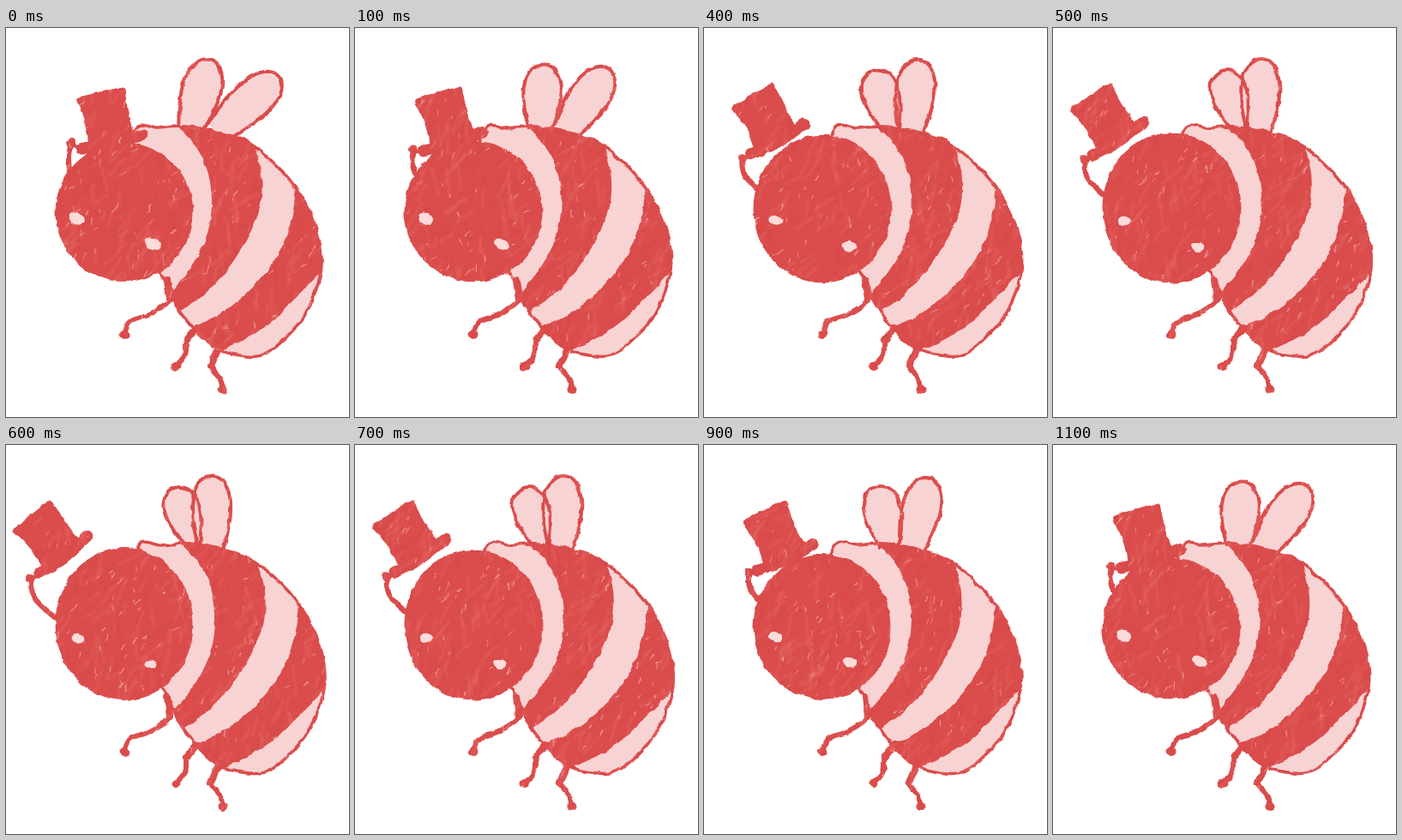
These frames come from a looping animation (400x454 px, 1200 ms). An HTML page with a canvas:

```html
<!DOCTYPE html>
<html lang="en">
<head>
<meta charset="utf-8">
<title>Bee tipping its hat</title>
<style>
  html, body { margin: 0; width: 100%; height: 100%; overflow: hidden; background: #fff; }
  canvas { display: block; filter: url(#rough); }
  svg { position: absolute; width: 0; height: 0; }
</style>
</head>
<body>
<canvas id="stage" width="400" height="454"></canvas>
<svg>
  <filter id="rough" x="0" y="0" width="1" height="1" color-interpolation-filters="sRGB">
    <feTurbulence id="grain" type="fractalNoise" baseFrequency=".08" numOctaves="2" result="n"/>
    <feDisplacementMap in="SourceGraphic" in2="n" scale="5" xChannelSelector="R" yChannelSelector="G"/>
  </filter>
</svg>
<script>
const W = 400, H = 454, RED = '#db4c4c', PINK = '#f8d3d3';
const STEP = 100, LAST = 6;

const stage = document.getElementById('stage').getContext('2d');
const ink = new OffscreenCanvas(W, H).getContext('2d');
const grain = document.getElementById('grain');
ink.lineCap = ink.lineJoin = 'round';

// Smooth curve through x,y pairs; joins on to an existing path if given
function curve(pts, closed, path = new Path2D()) {
  const n = pts.length / 2;
  const p = i => {
    i = closed ? (i + n) % n : Math.max(0, Math.min(n - 1, i));
    return [pts[2 * i], pts[2 * i + 1]];
  };
  path.lineTo(...p(0));
  for (let i = 0; i < (closed ? n : n - 1); i++) {
    const [a, b, c, d] = [p(i - 1), p(i), p(i + 1), p(i + 2)];
    path.bezierCurveTo(b[0] + (c[0] - a[0]) / 6, b[1] + (c[1] - a[1]) / 6,
      c[0] - (d[0] - b[0]) / 6, c[1] - (d[1] - b[1]) / 6, ...c);
  }
  return path;
}

// Stripe between two curves, closed off at two points outside the body
function band(inner, low, outer, high) {
  const path = curve(inner);
  path.lineTo(...low);
  curve(outer, false, path);
  path.lineTo(...high);
  return path;
}

const body = curve([150,122, 180,117, 212,115, 250,122, 285,134, 320,163, 345,194, 364,235, 370,275,
  362,310, 345,343, 305,380, 268,381, 242,371, 217,347, 198,320, 186,292, 140,220], true);
const stripes = [
  band([202,115, 223,138, 237,167, 242,205, 235,246, 216,282, 193,310], [188,335],
    [206,330, 233,311, 260,282, 283,246, 298,210, 300,172, 292,138], [275,95]),
  band([340,186, 336,217, 325,252, 306,284, 277,315, 244,338, 216,350], [220,385],
    [250,377, 277,365, 309,345, 335,320, 354,301, 372,281], [410,225])
];
const legs = [
  [188,294, 191,317, 168,334, 145,343, 138,358],
  [222,350, 211,364, 209,381, 198,395],
  [247,376, 239,394, 249,408, 253,422]
];

// Teardrop from a base point to a tip; root is the base width relative to the belly
function wing(x, y, tipX, tipY, root) {
  const dx = tipX - x, dy = tipY - y, unit = 22 / Math.hypot(dx, dy), pts = [];
  for (let i = -6; i <= 6; i++) {
    const a = i * Math.PI / 12, t = Math.cos(a);
    const s = Math.sin(a) * (root + (1.7 - root) * t) * unit;
    pts.push(x + dx * t - dy * s, y + dy * t + dx * s);
  }
  return curve(pts);
}

function oval(ctx, x, y, rx, ry, tilt = 0) {
  ctx.beginPath();
  ctx.ellipse(x, y, rx, ry, tilt, 0, 2 * Math.PI);
  ctx.fill();
}

function line(path, width) {
  ink.lineWidth = width;
  ink.stroke(path);
}

function drawLeg(pts) {
  line(curve(pts), 6);
  line(curve(pts.slice(0, 4)), 8);
  oval(ink, ...pts.slice(-2), 5.5, 5);
}

function drawHat(x, y, angle) {
  const crown = new Path2D();
  crown.moveTo(-28, -56);
  crown.lineTo(22, -59);
  crown.quadraticCurveTo(19, -25, 24, -4);
  crown.lineTo(-25, -2);
  crown.quadraticCurveTo(-20, -25, -28, -56);
  ink.save();
  ink.translate(x, y);
  ink.rotate(angle);
  ink.fill(crown);
  line(crown, 7);
  line(curve([-36, 1, 0, 2, 36, -3]), 13);
  ink.restore();
}

function drawArm(u, hatX, hatY, angle) {
  const x = 76 - 48 * u, y = 134 + 21 * Math.sqrt(u);
  const endX = 74 - 14 * u, endY = 166 + 38 * u;
  const elbowX = (x + endX) / 2 - 2 - 8 * u, elbowY = (y + endY) / 2;
  line(curve([x, y, elbowX, elbowY, endX, endY]), 6);
  oval(ink, x, y, 5, 5);
  const grip = [hatX - 36 * Math.cos(angle), hatY - 36 * Math.sin(angle) + 3];
  line(curve([x, y, ...grip]), 4);
}

function random(seed) {
  return () => (seed = (seed * 16807) % 2147483647) / 2147483647;
}

// Marker strokes scattered over the inked areas only
function strokes(rnd, count, length, width, colors) {
  ink.lineWidth = width;
  for (let i = 0; i < count; i++) {
    const x = rnd() * W, y = rnd() * H, a = 2 + (rnd() - .5) * 1.4, l = length * (.4 + rnd());
    ink.strokeStyle = colors[i % colors.length];
    ink.beginPath();
    ink.moveTo(x, y);
    ink.lineTo(x + Math.cos(a) * l, y + Math.sin(a) * l);
    ink.stroke();
  }
}

function draw(pose) {
  const u = pose / LAST, back = (1 - u) ** 3, drift = 4 * u - 2;
  const wings = [
    wing(215 + 4 * u, 118, 197 + 41 * back, 50 - 13 * back, .65 - .3 * u),
    wing(245 - 6 * u, 122, 240 + 78 * (1 - u) ** 1.8, 36 + 20 * back, .65)
  ];
  const hatX = 124 - 9.5 * pose, hatY = 134 - .8 * pose;
  const angle = -(10 + 4.1 * pose) * Math.PI / 180;

  stage.clearRect(0, 0, W, H);
  stage.fillStyle = PINK;
  wings.forEach(w => stage.fill(w));
  stage.save();
  stage.translate(drift, 0);
  stage.fill(body);
  stage.restore();

  ink.clearRect(0, 0, W, H);
  ink.fillStyle = ink.strokeStyle = RED;
  wings.forEach(w => line(w, 4));
  ink.save();
  ink.translate(drift, 0);
  line(body, 3.6);
  ink.clip(body);
  stripes.forEach(s => ink.fill(s));
  ink.restore();
  legs.forEach(drawLeg);
  oval(ink, 138, 215 - 6 * u, 80.5, 81 + 8 * u);
  drawArm(u, hatX, hatY, angle);
  drawHat(hatX, hatY, angle);

  const rnd = random(311 + pose * 977);
  ink.save();
  ink.globalCompositeOperation = 'source-atop';
  strokes(rnd, 900, 24, 4, ['rgba(205,55,58,.1)', 'rgba(240,125,122,.15)']);
  strokes(rnd, 380, 6, 1.1, ['rgba(250,200,195,.6)', 'rgba(245,170,165,.5)']);
  ink.restore();
  stage.drawImage(ink.canvas, 0, 0);

  stage.fillStyle = '#fbdcda';
  for (const [x, y] of [[82 + 2 * u, 222 + 4 * u], [171 - 2 * u, 252 + 4 * u]])
    oval(stage, x, y, 9.5 - 2 * u, 6.8 - 1.6 * u, .5 - .35 * u);
  grain.setAttribute('seed', pose + 1);
}

let shown = -1;
function tick() {
  const step = Math.floor(performance.now() / STEP) % (2 * LAST);
  const pose = LAST - Math.abs(LAST - step);
  if (pose !== shown) draw(shown = pose);
  requestAnimationFrame(tick);
}
tick();
</script>
</body>
</html>
```
